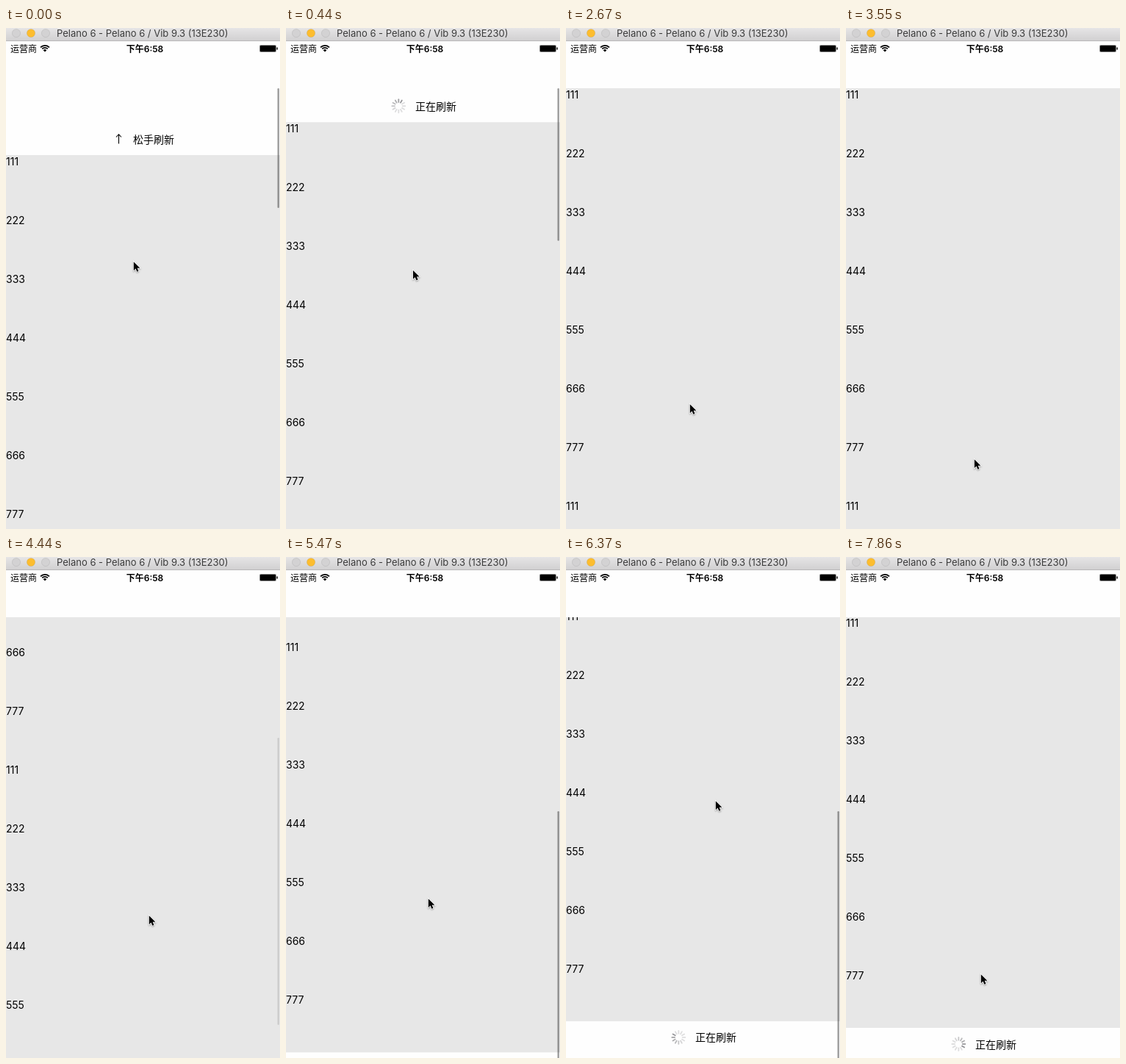
Animation, 373 px wide and 682 px high, one loop 8000 ms. Source, as an HTML page with a canvas:

```html
<!DOCTYPE html>
<html lang="zh">
<head>
<meta charset="utf-8">
<title>Pull to refresh</title>
<style>
  html, body { margin: 0; width: 100%; height: 100%; overflow: hidden; background: #fff; }
  canvas { display: block; width: 373px; height: 682px; }
</style>
</head>
<body>
<canvas id="stage"></canvas>
<script>
const W = 373, H = 682, LOOP = 8000, STEPS = 54, STEP = LOOP / STEPS;
const TOP = 82, VIEW = 603, ROW = 80, ROWS = 14, BAR = 44;
const MAX_SCROLL = ROWS * ROW - VIEW;
const FONT = 'Inter, "Noto Sans CJK SC", "Noto Sans CJK", sans-serif';

const canvas = document.getElementById('stage');
const ctx = canvas.getContext('2d');
const dpr = window.devicePixelRatio || 1;
canvas.width = W * dpr;
canvas.height = H * dpr;

const progress = (t, start, end) => Math.min(1, Math.max(0, (t - start) / (end - start)));

function smooth(t, start, end) {
  const p = progress(t, start, end);
  return p * p * (3 - 2 * p);
}

const easeOut = (t, start, end) => 1 - (1 - progress(t, start, end)) ** 3;

function scrollAt(t) {
  const release = 47 * easeOut(t, 100, 640);
  const retract = BAR * easeOut(t, 2222, 2462);
  const flick = MAX_SCROLL * smooth(t, 3577, 4942);
  const drag = 19 * smooth(t, 5005, 5890);
  const pull = 34.3 * easeOut(t, 6074, 6440);
  const settle = 9.3 * smooth(t, 6400, 6800);
  return -91 + release + retract + flick + drag + pull - settle;
}

// Pointer rests: time, x, y
const stops = [
  [140, 173, 317], [1480, 167, 406], [2667, 168, 511], [3560, 174, 586],
  [4444, 194, 487], [5481, 193, 464], [6074, 193, 464], [6370, 203, 331],
  [7111, 204, 520], [7852, 183, 567]
];

function cursorAt(t) {
  let [, x, y] = stops[0];
  for (let i = 1; i < stops.length; i++) {
    const [t0, x0, y0] = stops[i - 1], [t1, x1, y1] = stops[i];
    const p = smooth(t, t0, t1);
    x += (x1 - x0) * p;
    y += (y1 - y0) * p;
  }
  return [x, y];
}

function rect(x, y, w, h, fill) {
  ctx.fillStyle = fill;
  ctx.fillRect(x, y, w, h);
}

function pill(x, y, w, h, r, fill) {
  ctx.beginPath();
  ctx.roundRect(x, y, w, h, r);
  ctx.fillStyle = fill;
  ctx.fill();
}

function text(str, x, y, size, weight = 400, color = '#000', align = 'left') {
  ctx.font = `${weight} ${size}px ${FONT}`;
  ctx.textAlign = align;
  ctx.fillStyle = color;
  ctx.fillText(str, x, y);
}

function titleBar() {
  const g = ctx.createLinearGradient(0, 0, 0, 17);
  g.addColorStop(0, '#e6e5e6');
  g.addColorStop(1, '#d1d0d1');
  rect(0, 0, W, 17, g);
  rect(0, 17, W, 1, '#b9b8b9');
  ['#d3d2d3', '#fdbd2f', '#d3d2d3'].forEach((fill, i) => {
    ctx.beginPath();
    ctx.arc(14 + i * 20, 7, 5.6, 0, 7);
    ctx.fillStyle = fill;
    ctx.fill();
    ctx.strokeStyle = 'rgba(0,0,0,.1)';
    ctx.lineWidth = .8;
    ctx.stroke();
  });
  text('Pelano 6 - Pelano 6 / Vib 9.3 (13E230)', 69, 12, 13, 400, '#3b3b3b');
}

function statusBar() {
  text('运营商', 6, 32.5, 12);
  text('下午6:58', 189, 32.5, 12, 600, '#000', 'center');

  ctx.strokeStyle = ctx.fillStyle = '#000';
  ctx.lineWidth = 1.7;
  ctx.lineCap = 'butt';
  for (const r of [8.2, 5.2]) {
    ctx.beginPath();
    ctx.arc(53, 32, r, -Math.PI * .76, -Math.PI * .24);
    ctx.stroke();
  }
  ctx.beginPath();
  ctx.moveTo(53, 32.5);
  ctx.arc(53, 32.5, 3.2, -Math.PI * .76, -Math.PI * .24);
  ctx.fill();

  pill(345, 23, 23, 10, 2, '#888');
  pill(346, 24, 21, 8, 1, '#000');
  pill(368.4, 26.3, 1.4, 3.4, .7, '#000');
}

function spinner(x, y, head) {
  ctx.lineWidth = 1.8;
  ctx.lineCap = 'round';
  for (let i = 0; i < 12; i++) {
    const age = (head - i + 12) % 12;
    const a = i * Math.PI / 6 - Math.PI / 2;
    const c = Math.cos(a), s = Math.sin(a);
    ctx.strokeStyle = `rgba(95,95,100,${Math.max(.2, .66 - age * .08)})`;
    ctx.beginPath();
    ctx.moveTo(x + c * 5.3, y + s * 5.3);
    ctx.lineTo(x + c * 9, y + s * 9);
    ctx.stroke();
  }
}

function loading(y, head) {
  spinner(153.3, y, head % 12);
  text('正在刷新', 176, y + 5.5, 14);
}

function releaseHint(y) {
  ctx.strokeStyle = '#000';
  ctx.lineWidth = 1.1;
  ctx.lineCap = 'butt';
  ctx.beginPath();
  ctx.moveTo(153.5, y + 6.5);
  ctx.lineTo(153.5, y - 6);
  ctx.moveTo(150, y - 2.5);
  ctx.lineTo(153.5, y - 6.3);
  ctx.lineTo(157, y - 2.5);
  ctx.stroke();
  text('松手刷新', 173, y + 5.5, 14);
}

function scrollThumb(t, scroll) {
  const shown = 1 - smooth(t, 600, 900) + smooth(t, 4330, 4640) - smooth(t, 6800, 7110);
  if (shown <= 0) return;
  const full = t < 2000 ? 254 : 391 - 52 * smooth(t, 4444, 4889);
  const length = full + Math.min(0, scroll);
  const y = TOP + (VIEW - length) * progress(scroll, 0, 467);
  pill(369.5, y, 2.5, length, 1.25, `rgba(0,0,0,${.37 * shown})`);
}

function list(t) {
  const scroll = scrollAt(t);
  const top = TOP - scroll;
  const bottom = top + ROWS * ROW;
  const tick = Math.floor(t * 12 / 1000);
  ctx.save();
  ctx.beginPath();
  ctx.rect(0, TOP, W, H - TOP);
  ctx.clip();
  rect(0, top, W, ROWS * ROW, '#e7e7e7');
  for (let i = 0; i < ROWS; i++) {
    text(String(i % 7 + 1).repeat(3), 0, top + i * ROW + 14, 14);
  }
  if (t < 140) releaseHint(top - BAR / 2);
  else if (t < 2600) loading(top - BAR / 2, tick + 8);
  if (t > 6200) loading(bottom + BAR / 2, tick + 6);
  scrollThumb(t, scroll);
  ctx.restore();
}

function cursor(x, y) {
  const shape = [[0, 0], [0, 14.2], [3.2, 11.2], [5.4, 16.2], [7.9, 15.1], [5.8, 10.3], [10.2, 10.3]];
  ctx.save();
  ctx.translate(x + .8, y + 1.2);
  ctx.scale(.84, .84);
  ctx.beginPath();
  shape.forEach(([px, py]) => ctx.lineTo(px, py));
  ctx.closePath();
  ctx.shadowColor = 'rgba(0,0,0,.35)';
  ctx.shadowBlur = 2 * dpr;
  ctx.shadowOffsetY = dpr;
  ctx.lineWidth = 1.8;
  ctx.strokeStyle = '#fff';
  ctx.stroke();
  ctx.shadowColor = 'transparent';
  ctx.fillStyle = '#000';
  ctx.fill();
  ctx.restore();
}

function draw(now) {
  // The picture advances in even steps; the margin absorbs timer rounding
  const t = Math.floor((now % LOOP + 14) / STEP) % STEPS * STEP;
  ctx.setTransform(dpr, 0, 0, dpr, 0, 0);
  rect(0, 0, W, H, '#fefefe');
  list(t);
  titleBar();
  statusBar();
  cursor(...cursorAt(t));
  requestAnimationFrame(draw);
}

draw(performance.now());
</script>
</body>
</html>
```
